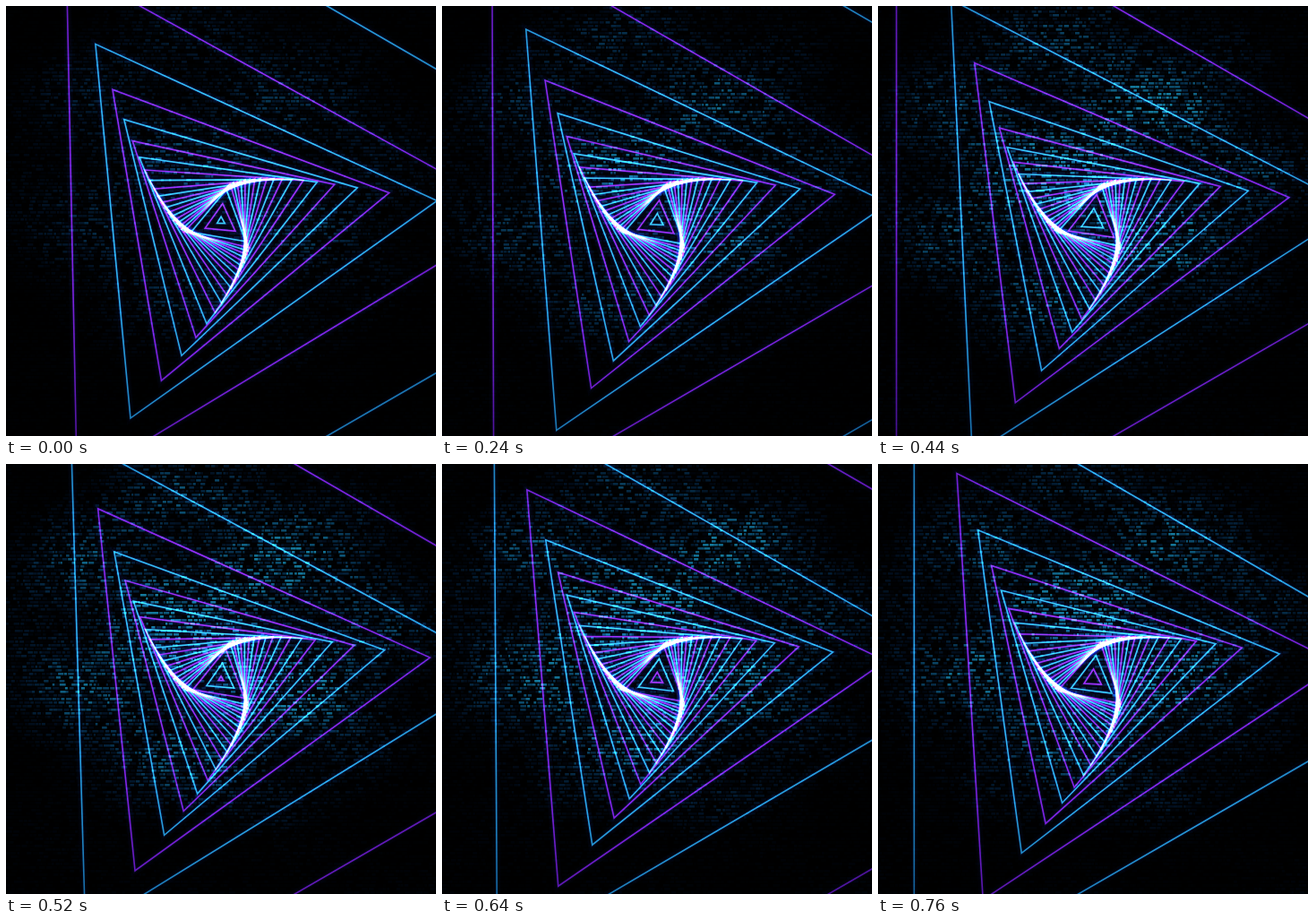
These frames come from a looping animation (480 px wide and 480 px high, 840 ms). An HTML page with a canvas:

```html
<!DOCTYPE html>
<html>
<head>
<meta charset="utf-8">
<style>
html, body { margin: 0; width: 100%; height: 100%; overflow: hidden; background: #000; }
canvas { display: block; width: 480px; height: 480px; }
</style>
</head>
<body>
<canvas id="stage" width="480" height="480"></canvas>
<script>
const ctx = document.getElementById('stage').getContext('2d');
const SIZE = 480, MID = SIZE / 2, LOOP = 840, TICK = 40;
const PHASES = 25; // phases in which the tunnel moves on by two triangles

// Strokes fade from bright near the middle to dark at the rim
function fade(near, half, far) {
  const g = ctx.createRadialGradient(250, 195, 0, 250, 195, 400);
  [near, half, far].forEach((color, i) => g.addColorStop(i / 2, color));
  return g;
}
const CYAN = fade('rgb(65,230,240)', 'rgb(42,175,218)', 'rgb(14,85,135)');
const PURPLE = fade('rgb(185,45,240)', 'rgb(140,28,215)', 'rgb(65,14,130)');
const GLOW = fade('rgb(30,45,190)', 'rgb(15,30,120)', 'rgb(0,0,30)');

function random(seed) {
  return () => {
    seed = (seed + 0x6D2B79F5) | 0;
    let t = Math.imul(seed ^ seed >>> 15, 1 | seed);
    t ^= t + Math.imul(t ^ t >>> 7, 61 | t);
    return ((t ^ t >>> 14) >>> 0) / 4294967296;
  };
}

// Drifting soft clouds inside a wide oval
function light(x, y, phase) {
  const oval = 1 - ((x - 235) / 275) ** 2 - ((y - 190) / 240) ** 2;
  const drift = Math.sin(phase * 2 * Math.PI / PHASES) * 15;
  const cloud = Math.cos((x - 65 + drift) / 42) * Math.cos((y - 90 - drift) / 25.5);
  return Math.max(.06, oval) * (.75 + .4 * cloud);
}

function drawDashes(phase) {
  const rnd = random(17 + phase);
  const level = .65 + .6 * Math.sin(Math.PI * phase / PHASES);
  for (let y = 1; y < SIZE; y += 4) {
    for (let x = -rnd() * 8; x < SIZE;) {
      const w = 2 + rnd() * 5;
      const glow = Math.min(1, light(x, y, phase) * level * rnd() ** 1.4 * 1.2);
      ctx.fillStyle = `rgba(${glow * 20},${35 + glow * 85},${105 + glow * 50},${glow})`;
      ctx.fillRect(x, y, w, 2.6);
      x += w + rnd() * 2;
    }
  }
}

function stroke(style, width, alpha) {
  ctx.strokeStyle = style;
  ctx.lineWidth = width;
  ctx.globalAlpha = alpha;
  ctx.stroke();
}

// A triangle grows in the middle, unwinds from -90 degrees and rushes past
function drawTriangle(age, color) {
  const grow = Math.min(1, .02 + .37 * age);
  if (grow <= 0) return;
  const radius = grow * 886.5 / (23.96 - age);
  const turn = Math.min(0, 4.17 * age - 90) * Math.PI / 180;
  ctx.beginPath();
  for (let i = 0; i < 3; i++) {
    const a = turn + i * Math.PI * 2 / 3;
    ctx.lineTo(MID + radius * Math.cos(a), MID + radius * Math.sin(a));
  }
  ctx.closePath();
  stroke(GLOW, 9, .07);
  stroke(GLOW, 4, .2);
  stroke(color, 1.6, .9);
}

function draw(phase) {
  ctx.globalAlpha = 1;
  ctx.globalCompositeOperation = 'source-over';
  ctx.fillStyle = '#000';
  ctx.fillRect(0, 0, SIZE, SIZE);
  ctx.globalCompositeOperation = 'lighter';
  drawDashes(phase);
  for (let j = -2; j < 24; j++) {
    const age = j + .3 + 2 * phase / PHASES;
    if (age < 23.6) drawTriangle(age, j % 2 ? PURPLE : CYAN);
  }
}

// Rest for five ticks, then take uneven steps of one or two ticks
function phaseAt(time) {
  const tick = Math.floor(time % LOOP / TICK);
  const step = Math.max(0, Math.floor((tick - 4.5) / 1.41) + 1);
  return Math.max(0, Math.round(1.7 * step - .7));
}

let shown = -1;
function frame() {
  const phase = phaseAt(performance.now());
  if (phase !== shown) draw(shown = phase);
  requestAnimationFrame(frame);
}
frame();
</script>
</body>
</html>
```
